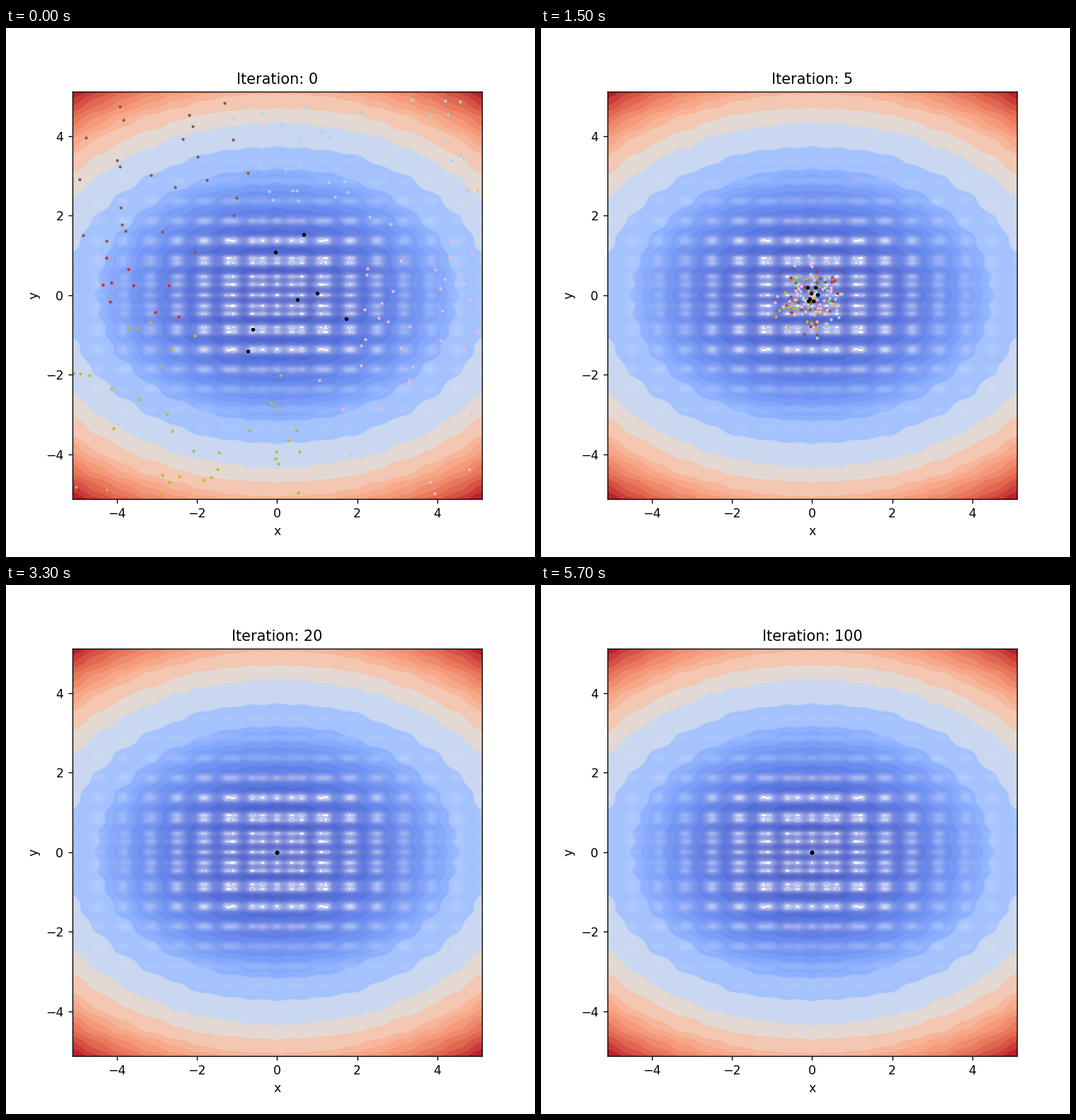
Recreate the animation shown at these times as a matplotlib script. Size 748 px wide and 748 px high, loop 6 s.

```python
import numpy as np
import matplotlib.pyplot as plt
from matplotlib.animation import FuncAnimation
from matplotlib.colors import BoundaryNorm, ListedColormap

LIM = 5.12
DPI = 125
STEPS = [*range(11), *range(20, 101, 10)]

# Each empire: colour, number of colonies, sector of the plane in degrees.
EMPIRES = [
    ("#8c564b", 25, 103, 163),
    ("#d62728", 9, 166, 193),
    ("#bcbd22", 37, 190, 281),
    ("#f7b6d2", 40, 290, 380),
    ("#9edae5", 36, 30, 108),
    ("#ffbb78", 2, 25, 29),
]
LEADERS = np.array([(0.66, 1.52), (-0.05, 1.08), (1.0, 0.05), (0.5, -0.11),
                    (1.72, -0.59), (-0.6, -0.86), (-0.73, -1.41)])


def bohachevsky(x, y):
    return (x**2 + 2 * y**2 - 0.3 * np.cos(3 * np.pi * x)
            - 0.4 * np.cos(4 * np.pi * y) + 0.7)


def settle(rng, count, start, stop):
    """Scatter colonies over a sector, out to the border of the square."""
    angle = np.radians(rng.uniform(start, stop, count))
    ray = np.column_stack([np.cos(angle), np.sin(angle)])
    reach = LIM / np.abs(ray).max(axis=1)
    return ray * (reach * np.sqrt(rng.uniform(0.15, 1, count)))[:, None]


def pull(step):
    return max(0, 1 - step / 4.5)


def spread(step):
    return np.interp(step, [0, 2, 5, 7, 10, 20], [0, 0.45, 0.38, 0.24, 0.08, 0])


def move(start, step, seed, noise=1.0):
    """Draw the group to the origin while its members close up at random."""
    home = start.mean(axis=0)
    jitter = np.random.default_rng([seed, step]).normal(size=start.shape)
    k = pull(step)
    return home * k + (start - home) * k**3 + jitter * noise * spread(step)


def paint_field(fig, ax):
    """Draw the dense contours once and keep them as a still backdrop."""
    grid = np.linspace(-LIM, LIM, 300)
    X, Y = np.meshgrid(grid, grid)
    Z = bohachevsky(X, Y)
    edges = np.concatenate([np.arange(0, 20, 2.1), [21, 29, 38.7, 45.5],
                            np.arange(52, 81, 3)])
    mids = (edges[:-1] + edges[1:]) / 2
    cmap = ListedColormap(plt.get_cmap("coolwarm")(mids / Z.max()))
    ax.set_axis_off()
    lines = ax.contour(X, Y, Z, levels=np.linspace(0, Z.max(), 1000), alpha=0.4,
                       cmap=cmap, norm=BoundaryNorm(edges, cmap.N))
    fig.canvas.draw()
    still = np.asarray(fig.canvas.buffer_rgba()).copy()
    lines.remove()
    ax.set_axis_on()
    ax.patch.set_visible(False)
    fig.figimage(still, zorder=-1)


fig, ax = plt.subplots(figsize=(748 / DPI, 748 / DPI), dpi=DPI)
ax.set(xlim=(-LIM, LIM), ylim=(-LIM, LIM))
paint_field(fig, ax)
ax.set(xlabel="x", ylabel="y")
title = ax.set_title("")

rng = np.random.default_rng(7)
groups = []
for color, count, start, stop in EMPIRES:
    colonies = settle(rng, count, start, stop)
    groups.append((ax.scatter(*colonies.T, s=6, c=color, linewidths=0), colonies))
leaders = ax.scatter(*LEADERS.T, s=10, c="black", linewidths=0)


def update(frame):
    step = STEPS[frame]
    title.set_text(f"Iteration: {step}")
    for seed, (dots, colonies) in enumerate(groups):
        dots.set_offsets(move(colonies, step, seed))
    jitter = np.random.default_rng(step).normal(size=LEADERS.shape)
    leaders.set_offsets(LEADERS * pull(step) + jitter * 0.3 * spread(step))
    return [title, leaders] + [dots for dots, _ in groups]


anim = FuncAnimation(fig, update, frames=len(STEPS), interval=300,
                     repeat=True, repeat_delay=0)
plt.show()
```
